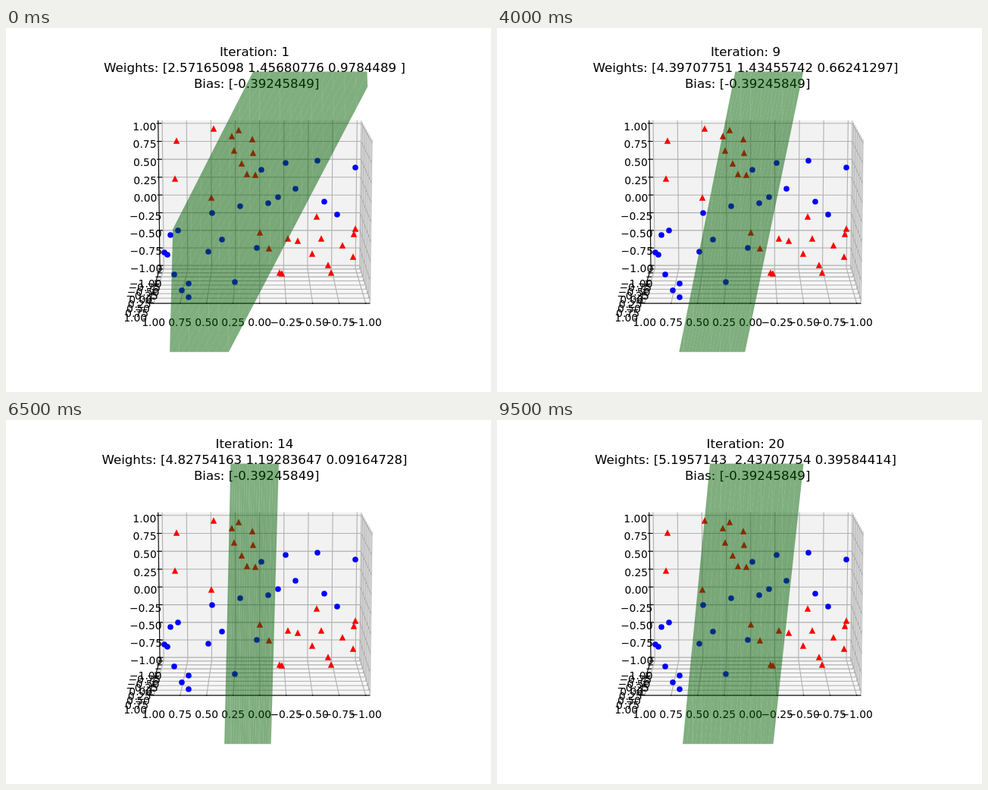
An HTML page with a canvas for the animation above (10 s loop, 640 by 480 pixels).

```html
<!DOCTYPE html>
<html lang="en">
<head>
<meta charset="utf-8">
<title>Separating plane</title>
<style>
html, body { margin: 0; width: 100%; height: 100%; overflow: hidden; background: #fff; }
canvas { display: block; }
</style>
</head>
<body>
<canvas id="stage" width="640" height="480"></canvas>
<script>
const ctx = document.getElementById('stage').getContext('2d');
const STEP = 500;
const BIAS = -0.39245849;
const FONT = '"DejaVu Sans", Verdana, sans-serif';

// One weight vector per iteration.
const weights = [
  [2.57165098, 1.45680776, 0.9784489],
  [2.87391642, 1.28317465, 1.10724583],
  [3.1564728, 1.13692574, 1.21853467],
  [3.41486515, 1.02061237, 1.30753769],
  [3.6185327, 1.09483126, 1.19264835],
  [3.82146593, 1.18346752, 1.05837914],
  [4.0175386, 1.26948317, 0.93271568],
  [4.20863174, 1.35264189, 0.79648253],
  [4.39707751, 1.43455742, 0.66241297],
  [4.46852317, 1.36172845, 0.45827136],
  [4.53916284, 1.28463917, 0.24735862],
  [4.60907046, 1.20753213, 0.03867478],
  [4.71836529, 1.18642735, -0.12748361],
  [4.82754163, 1.19283647, 0.09164728],
  [4.93827516, 1.19975382, 0.16283945],
  [5.04908639, 1.20668054, 0.23153117],
  [5.10026483, 1.42183659, 0.56173824],
  [5.15129222, 1.63737873, 0.88908055],
  [5.1736482, 2.03716459, 0.64251738],
  [5.1957143, 2.43707754, 0.39584414]
];

// Marker centres in stage pixels: x, y, x, y, ...
const circles = [
  337,187, 369,178, 411,175, 461,184, 382,212, 359,223, 346,231, 309,235,
  272,244, 420,229, 437,246, 227,267, 217,273, 209,296, 213,299, 285,279,
  267,295, 331,290, 222,325, 241,337, 232,346, 241,355, 302,335
];
const triangles = [
  274,133, 225,149, 223,199, 298,143, 307,135, 325,147, 301,162, 326,165,
  311,179, 318,193, 329,194, 271,224, 335,270, 347,291, 361,323, 364,324,
  372,278, 385,281, 410,249, 416,278, 404,298, 444,287, 461,265, 459,272,
  458,302, 425,313, 429,323
];

// Camera: 10 degrees up, looking along -y from ten box lengths away.
const COS = Math.cos(Math.PI / 18), SIN = Math.sin(Math.PI / 18);
const E = 1 + 1 / 24;
const ticks = Array.from({ length: 9 }, (_, i) => 1 - i / 4);

function project(x, y, z) {
  const depth = 10 - (y * COS + z * SIN) / 2;
  return [
    334.7 - x / 2 * 2681 / depth,
    237.4 - (z * COS - y * SIN) / 2 * 1997.8 / depth
  ];
}

function trace(points) {
  ctx.beginPath();
  for (const p of points) ctx.lineTo(...project(...p));
}

function line(color, ...points) {
  trace(points);
  ctx.strokeStyle = color;
  ctx.lineWidth = 1.11;
  ctx.stroke();
}

function pane(color, ...points) {
  trace(points);
  ctx.fillStyle = color;
  ctx.fill();
}

function label(value, x, y) {
  const text = value.toFixed(2).replace('-', '\u2212');
  ctx.fillText(text, x, y + 5);
}

function drawAxes() {
  const grid = '#b0b0b0', ink = '#000';
  pane('#f9f9f9', [-E, -E, -E], [-E, E, -E], [-E, E, E], [-E, -E, E]);
  pane('#f2f2f2', [E, -E, -E], [-E, -E, -E], [-E, -E, E], [E, -E, E]);
  pane('#f6f6f6', [E, -E, -E], [-E, -E, -E], [-E, E, -E], [E, E, -E]);

  for (const t of ticks) {
    line(grid, [t, -E, E], [t, -E, -E], [t, E, -E]);
    line(grid, [E, t, -E], [-E, t, -E], [-E, t, E]);
    line(grid, [E, -E, t], [-E, -E, t], [-E, E, t]);
  }

  line(ink, [E, E, -E], [-E, E, -E]);
  line(ink, [E, -E, -E], [E, E, -E]);
  line(ink, [E, -E, -E], [E, -E, E]);

  ctx.font = `13.89px ${FONT}`;
  ctx.textAlign = 'center';
  const out = E + 0.018, into = E - 0.036;
  for (const t of ticks) {
    line(ink, [t, out, -E], [t, into, -E]);
    line(ink, [out, t, -E], [into, t, -E]);
    line(ink, [out, -E, t], [into, -E, t]);
    ctx.fillStyle = ink;
    const px = project(t, E, -E), py = project(E, t, -E), pz = project(E, -E, t);
    label(t, px[0], px[1] + 24.5);
    label(t, py[0] - 18.5, py[1] + 19.5);
    label(t, pz[0] - 18, pz[1] + 4);
  }
}

function drawMarkers(points, color, shape) {
  ctx.fillStyle = ctx.strokeStyle = color;
  ctx.lineWidth = 1.39;
  for (let i = 0; i < points.length; i += 2) {
    ctx.beginPath();
    shape(points[i], points[i + 1]);
    ctx.closePath();
    ctx.fill();
    ctx.stroke();
  }
}

const circle = (x, y) => ctx.arc(x, y, 3.1, 0, 7);

function triangle(x, y) {
  ctx.moveTo(x, y - 3.1);
  ctx.lineTo(x + 3.1, y + 3.1);
  ctx.lineTo(x - 3.1, y + 3.1);
}

function formatWeights(w) {
  const signed = w.some(v => v < 0);
  const cells = w.map(v => (signed && v >= 0 ? ' ' : '') + String(v));
  const width = Math.max(...cells.map(c => c.length));
  return '[' + cells.map(c => c.padEnd(width, '\u00a0')).join(' ') + ']';
}

function drawTitle(step) {
  ctx.font = `16.67px ${FONT}`;
  ctx.textAlign = 'center';
  ctx.fillStyle = '#000';
  ctx.fillText(`Iteration: ${step + 1}`, 328, 37);
  ctx.fillText(`Weights: ${formatWeights(weights[step])}`, 328, 58);
  ctx.fillText(`\u00a0Bias: [${BIAS}]`, 328, 79);
}

// Facets are projected without near clipping, so steep planes fold over.
function drawPlane([a, b, c]) {
  const corner = (i, j) => {
    const x = i / 10 - 1, y = j / 10 - 1;
    return [x, y, -(a * x + b * y + BIAS) / c];
  };
  ctx.save();
  ctx.beginPath();
  ctx.rect(80, 57.6, 496, 369.6);
  ctx.clip();
  for (let i = 0; i < 19; i++) {
    for (let j = 0; j < 19; j++) {
      pane('rgba(0, 95, 0, 0.5)',
        corner(i, j), corner(i + 1, j), corner(i + 1, j + 1), corner(i, j + 1));
    }
  }
  ctx.restore();
}

function draw(step) {
  ctx.fillStyle = '#fff';
  ctx.fillRect(0, 0, 640, 480);
  drawAxes();
  drawTitle(step);
  drawMarkers(triangles, '#f00', triangle);
  drawMarkers(circles, '#00f', circle);
  drawPlane(weights[step]);
}

let shown = -1;
function tick() {
  const step = Math.floor(performance.now() / STEP) % weights.length;
  if (step !== shown) draw(shown = step);
  requestAnimationFrame(tick);
}
tick();
</script>
</body>
</html>
```
